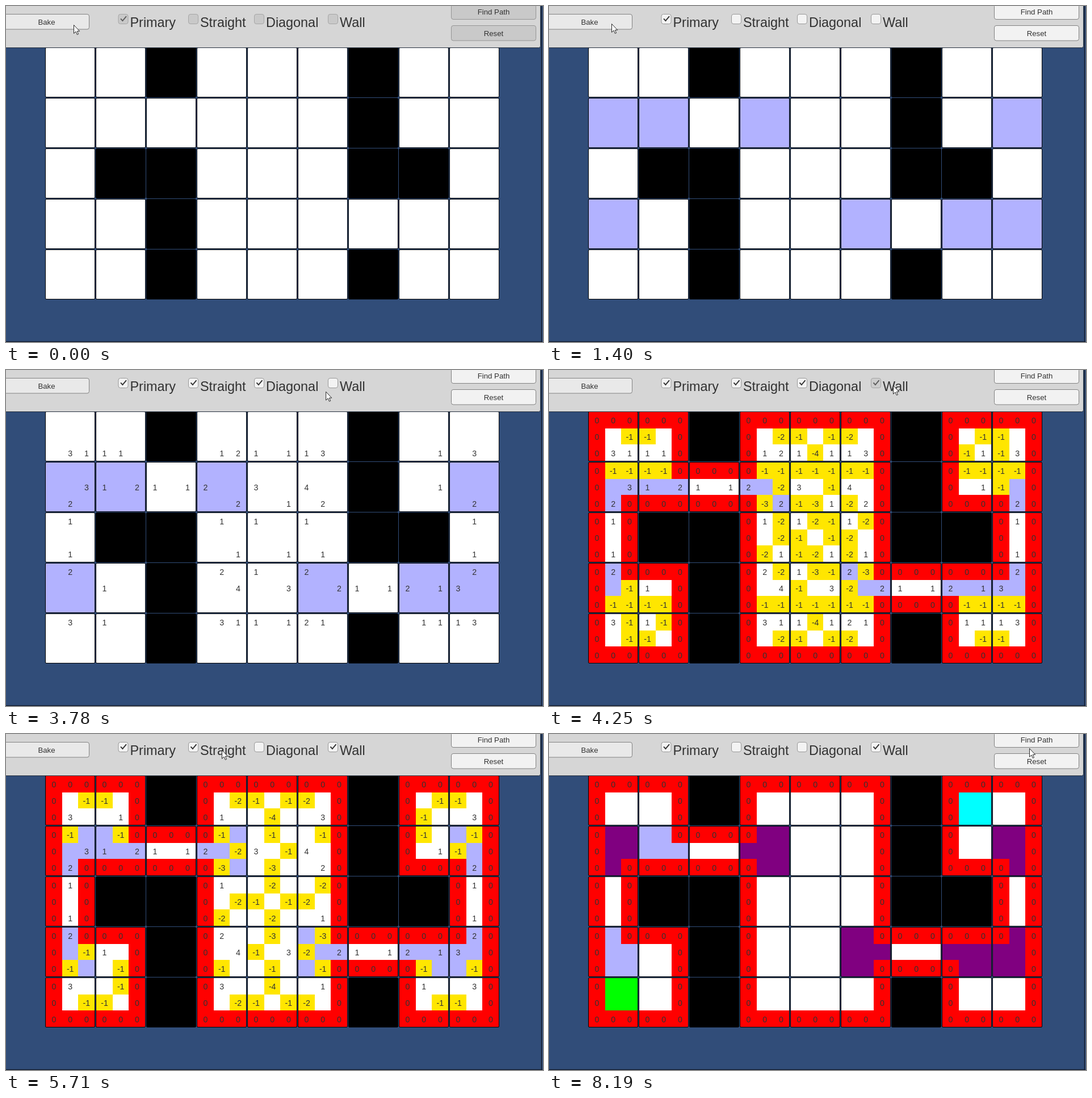
These frames come from a looping animation (946x592 px, 8270 ms). An HTML page:

```html
<!DOCTYPE html>
<html lang="en">
<head>
<meta charset="utf-8">
<title>Jump point grid</title>
<style>
  html, body { margin: 0; width: 100%; height: 100%; overflow: hidden; background: #314d79; }
  svg { display: block; width: 946px; height: 592px; font-family: "Liberation Sans", Arial, sans-serif; }
  text { fill: #323232; }
</style>
</head>
<body>
<svg id="stage" viewBox="0 0 946 592"></svg>
<script>
const LOOP = 8270, STEP = 77;
const MAP = ["..#...#..", "......#..", ".##...##.", "..#......", "..#...#.."];
const PITCH = 89, CELL = 86, SUB = CELL / 3, LEFT = 70, TOP = 74;
const WHITE = "#fff", JUMP = "#b2b2ff", PATH = "#800080";
const START = "4,0", GOAL = "0,7";
const ON_PATH = ["1,0", "1,3", "1,8", "3,5", "3,7", "3,8"];

const stage = document.getElementById("stage");
function add(tag, attrs, parent = stage, content) {
  const el = document.createElementNS("http://www.w3.org/2000/svg", tag);
  for (const key in attrs) el.setAttribute(key, attrs[key]);
  if (content !== undefined) el.textContent = content;
  parent.appendChild(el);
  return el;
}
const show = (el, on) => el.setAttribute("visibility", on ? "visible" : "hidden");

// Jump point search distances
const open = (r, c) => !!MAP[r] && MAP[r][c] === ".";

function isJump(r, c, dr, dc) {
  const pr = r - dr, pc = c - dc;
  return open(pr, pc) && open(r, c) && [1, -1].some(s =>
    !open(pr + s * dc, pc + s * dr) && open(r + s * dc, c + s * dr));
}

function straight(r, c, dr, dc) {
  let n = 0;
  while (open(r + dr, c + dc)) {
    r += dr; c += dc; n++;
    if (isJump(r, c, dr, dc)) return n;
  }
  return -n;
}

function diagonal(r, c, dr, dc) {
  let n = 0;
  while (open(r + dr, c) && open(r, c + dc) && open(r + dr, c + dc)) {
    r += dr; c += dc; n++;
    if (straight(r, c, dr, 0) > 0 || straight(r, c, 0, dc) > 0) return n;
  }
  return -n;
}

const isPrimary = (r, c) =>
  [[0, 1], [0, -1], [1, 0], [-1, 0]].some(([dr, dc]) => isJump(r, c, dr, dc));

// Grid
const cells = [];
const base = add("g", { "shape-rendering": "crispEdges" });
const layers = {};
for (const name of ["zero", "straightPlus", "straightMinus", "diagonalPlus", "diagonalMinus"])
  layers[name] = add("g", { "font-size": 14.2, "text-anchor": "middle" });
const outlines = add("g", { fill: "none", stroke: "#000" });

function addDistance(x, y, dr, dc, value) {
  const kind = dr && dc ? "diagonal" : "straight";
  const layer = layers[value ? kind + (value > 0 ? "Plus" : "Minus") : "zero"];
  const sx = x + (dc + 1) * SUB, sy = y + (dr + 1) * SUB;
  if (value <= 0) add("rect", {
    x: sx, y: sy, width: SUB, height: SUB,
    fill: value ? "#ffe600" : "#f00", "shape-rendering": "crispEdges"
  }, layer);
  add("text", { x: sx + SUB / 2 + 0.2, y: sy + SUB / 2 + 6 }, layer, value);
}

MAP.forEach((row, r) => [...row].forEach((mark, c) => {
  const x = LEFT + c * PITCH, y = TOP + r * PITCH;
  const free = mark === ".";
  const box = add("rect", { x, y, width: CELL, height: CELL, fill: free ? WHITE : "#000" }, base);
  add("rect", { x: x - 0.5, y: y - 0.5, width: CELL + 1, height: CELL + 1, rx: 1.5 }, outlines);
  if (!free) return;
  cells.push({ box, id: r + "," + c, primary: isPrimary(r, c) });
  for (let dr = -1; dr <= 1; dr++)
    for (let dc = -1; dc <= 1; dc++)
      if (dr || dc) addDistance(x, y, dr, dc, (dr && dc ? diagonal : straight)(r, c, dr, dc));
}));

// View border and toolbar
add("path", { d: "M943.5 0V592M0 591.5H946", stroke: "#10192a", "stroke-width": 1.4 });
add("path", { d: "M945.5 0V592", stroke: "#4a5f82" });
add("rect", { x: -10, y: -10, width: 951.5, height: 83.5, rx: 3, fill: "#d6d6d6", stroke: "#25303f" });

function button(label, x, y, width, light) {
  const face = add("rect", { x, y, width, height: 26.5, rx: 3.5, stroke: "#828282" });
  add("text", { x: x + width / 2, y: y + 18, "font-size": 13.2, "text-anchor": "middle" }, stage, label);
  return { face, light };
}

function toggle(label, x) {
  const face = add("rect", { x, y: 14.5, width: 17, height: 17, rx: 3.5, stroke: "#999" });
  const check = add("path", {
    d: `M${x + 4} 22.3l3.4 3.8 6.6-8`, fill: "none", stroke: "#323232", "stroke-width": 1.9
  });
  add("text", { x: x + 20.5, y: 36.6, "font-size": 23.4 }, stage, label);
  return { face, check, light: 243 };
}

const widgets = {
  bake: button("Bake", -3.5, 14.5, 150, 233),
  find: button("Find Path", 784.5, -3, 149, 242),
  reset: button("Reset", 784.5, 34.5, 149, 242),
  primary: toggle("Primary", 198),
  straight: toggle("Straight", 321.5),
  diagonal: toggle("Diagonal", 437.5),
  wall: toggle("Wall", 567.5)
};

const halo = add("circle", { r: 14, fill: "#f0e614", "fill-opacity": 0.65 });
const pointer = add("path", {
  d: "M.5 .5V15.3L4 12.1 6.3 17.4 8.5 16.5 6.3 11.3H10.6Z",
  fill: "#fff", stroke: "#111", "stroke-width": 0.9
});

// Timeline
const clicks = [
  { name: "bake", down: 1090, up: 1320 },
  { name: "straight", down: 2540, up: 2690 },
  { name: "diagonal", down: 3310, up: 3390 },
  { name: "wall", down: 4100, up: 4250 },
  { name: "diagonal", down: 5020, up: 5250 },
  { name: "straight", down: 5940, up: 6090 },
  { name: "find", down: 7260, up: 7410 }
];

const moves = [
  { from: 80, steps: 1, x: 118, y: 33 },
  { from: 460, steps: 2, x: 110, y: 31 },
  { from: 1700, steps: 11, x: 344, y: 27, bend: 8 },
  { from: 2540, steps: 1, x: 358, y: 22.6 },
  { from: 2770, steps: 4, x: 488, y: 29 },
  { from: 3630, steps: 5, x: 604, y: 28, bend: 10 },
  { from: 4100, steps: 1, x: 606, y: 27 },
  { from: 4560, steps: 5, x: 437, y: 28, bend: -9 },
  { from: 5330, steps: 6, x: 380, y: 28 },
  { from: 6340, steps: 10, x: 828, y: 10, bend: -9 },
  { from: 8190, steps: 1, x: 846, y: 25 }
];

function pointerAt(t) {
  let x = 119, y = 33;
  for (const m of moves) {
    if (t < m.from) break;
    const k = Math.min(m.steps, Math.floor((t - m.from + 6) / STEP) + 1) / m.steps;
    const eased = k * k * (3 - 2 * k);
    x += (m.x - x) * eased;
    y += (m.y - y) * eased + (m.bend || 0) * Math.sin(Math.PI * k);
  }
  return [x, y];
}

// How far a widget has faded to its pressed or disabled grey
function shade(name, t) {
  if (name !== "bake" && t < 1320 + 70) return t < 1320 ? 1 : 0.8;
  for (const c of clicks) {
    if (c.name !== name || t < c.down || t >= c.up + 70) continue;
    return t < c.down + 70 ? 0.6 : t < c.up ? 1 : 0.9;
  }
  return 0;
}

function cellColor(cell, baked, found) {
  if (found) {
    if (cell.id === START) return "#0f0";
    if (cell.id === GOAL) return "#0ff";
    if (ON_PATH.includes(cell.id)) return PATH;
  }
  return baked && cell.primary ? JUMP : WHITE;
}

function draw(t) {
  const on = name => clicks.filter(c => c.name === name && t >= c.up).length % 2 === 1;
  const state = { primary: true, straight: on("straight"), diagonal: on("diagonal"), wall: on("wall") };

  for (const cell of cells) cell.box.setAttribute("fill", cellColor(cell, on("bake"), on("find")));
  show(layers.zero, state.wall);
  for (const kind of ["straight", "diagonal"]) {
    show(layers[kind + "Plus"], state[kind]);
    show(layers[kind + "Minus"], state[kind] && state.wall);
  }

  for (const name in widgets) {
    const { face, check, light } = widgets[name];
    const grey = shade(name, t);
    const v = Math.round(light + (201 - light) * grey);
    face.setAttribute("fill", `rgb(${v},${v},${v})`);
    face.setAttribute("stroke-opacity", 1 - 0.25 * grey);
    if (check) {
      show(check, state[name]);
      check.setAttribute("stroke-opacity", 1 - 0.3 * grey);
    }
  }

  const [x, y] = pointerAt(t);
  pointer.setAttribute("transform", `translate(${x} ${y})`);
  halo.setAttribute("cx", x);
  halo.setAttribute("cy", y);
  show(halo, clicks.some(c => t >= c.down && t < c.up));
}

const began = performance.now();
function tick() {
  draw((performance.now() - began) % LOOP);
  requestAnimationFrame(tick);
}
tick();
</script>
</body>
</html>
```
